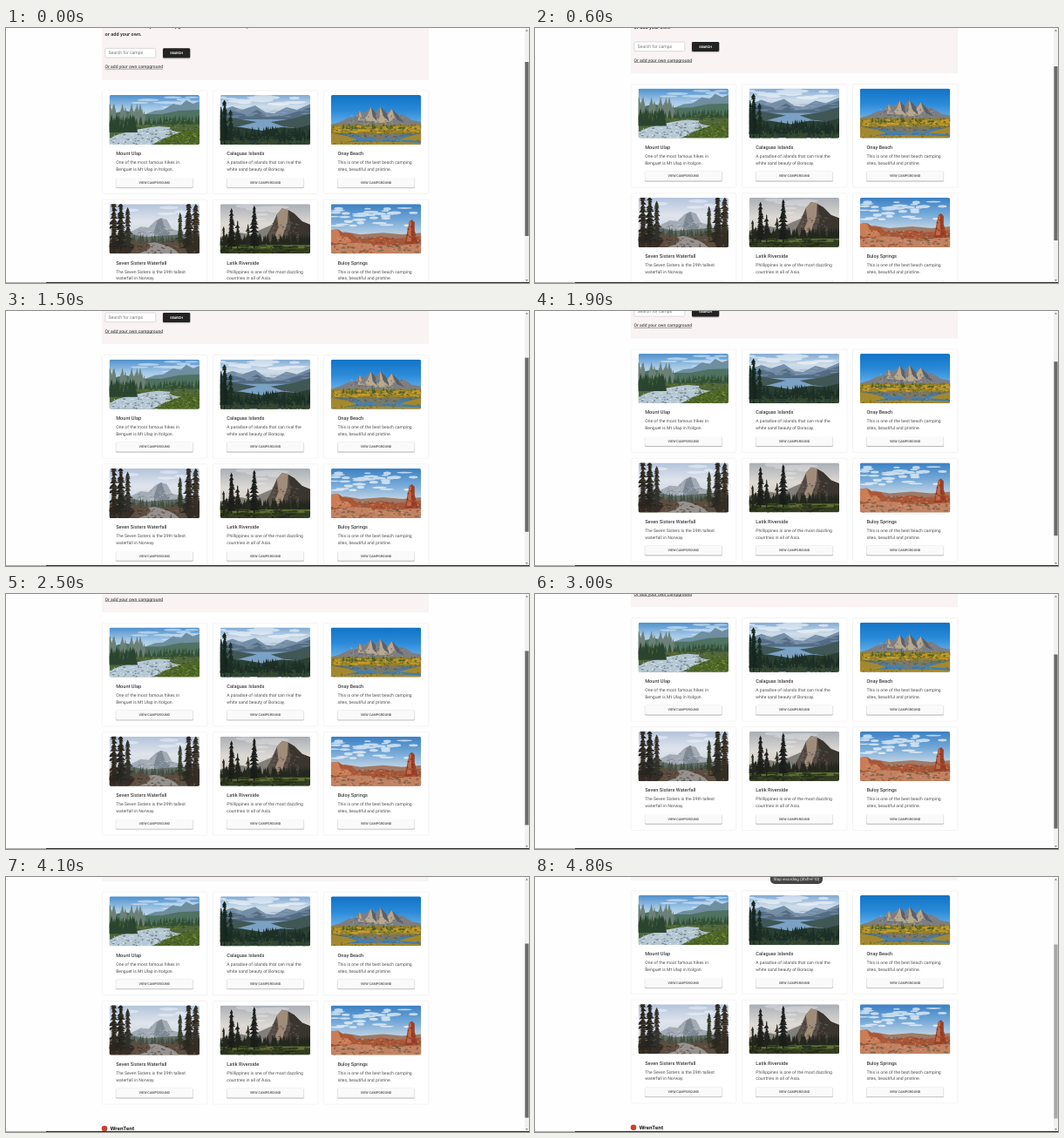
An HTML page for the animation above (4.9 s loop, 600 px wide and 293 px high).

```html
<!DOCTYPE html>
<html lang="en">
<head>
<meta charset="utf-8">
<style>
html, body { margin: 0; width: 100%; height: 100%; overflow: hidden; background: #fefefe; }
svg { display: block; }
text { font-family: Roboto, sans-serif; font-size: 5.06px; fill: #4f4f4f; text-rendering: geometricPrecision; }
.title, .lead { font-size: 5.63px; font-weight: 500; fill: #414141; }
.lead { font-weight: 600; }
.btn { font-size: 3.75px; font-weight: 500; text-anchor: middle; }
</style>
</head>
<body>
<svg id="stage" width="600" height="293" viewBox="0 0 600 293"></svg>
<script>
let seed = 7;
const rnd = () => (seed = seed * 16807 % 2147483647) / 2147483647;
const between = (a, b) => a + (b - a) * rnd();

const rect = (x, y, w, h, fill, more = '') =>
  `<rect x="${x}" y="${y}" width="${w}" height="${h}" fill="${fill}" ${more}/>`;
const text = (x, y, str, cls = '', more = '') => `<text x="${x}" y="${y}" class="${cls}" ${more}>${str}</text>`;
const shape = (fill, d, more = '') => `<path fill="${fill}" d="${d}" ${more}/>`;

// Button with a soft shadow below
const raised = (x, y, w, h, fill) =>
  rect(x - .6, y + .2, w + 1.2, h + 1.3, '#000', 'rx="1.8" opacity=".08"') +
  rect(x - .2, y + .3, w + .4, h + .6, '#000', 'rx="1.5" opacity=".2"') +
  rect(x, y, w, h, fill, 'rx="1.3"');

let gradients = 0;
function fade(y, h, ...colors) {
  const id = 'g' + gradients++;
  const stops = colors.map((c, i) => `<stop offset="${i / (colors.length - 1)}" stop-color="${c}"/>`).join('');
  return `<linearGradient id="${id}" x2="0" y2="1">${stops}</linearGradient>` + rect(0, y, 104, h, `url(#${id})`);
}

function forest(x0, x1, y, h, n, fill) {
  let d = '';
  for (let i = 0; i < n; i++) {
    const x = between(x0, x1), t = h * between(.5, 1), w = t * .2;
    d += `M${x - w} ${y}L${x} ${y - t}L${x + w} ${y}Z`;
  }
  return shape(fill, d);
}

// Tall ragged conifer
function pine(x, top, base, w, fill) {
  let d = `M${x - .6} ${base}V${top}h1.2V${base}Z`;
  for (let y = top; y < base - 6; y += 2.2) {
    const r = w * (.3 + .7 * (y - top) / (base - top)) * between(.5, 1.2);
    const l = r * between(.6, 1.3);
    d += `M${x} ${y - 1.5}L${x + r} ${y + 3}L${x - l} ${y + 3.4}Z`;
  }
  return shape(fill, d);
}

function blobs(x0, x1, y0, y1, w, h, n, fill, alpha) {
  let s = '';
  for (let i = 0; i < n; i++) {
    s += `<ellipse cx="${between(x0, x1)}" cy="${between(y0, y1)}" rx="${w * between(.4, 1)}" ry="${h * between(.4, 1)}"/>`;
  }
  return `<g fill="${fill}" opacity="${alpha}">${s}</g>`;
}

// Fine light and dark texture
const grain = (x0, x1, y0, y1, n, dark, light) =>
  blobs(x0, x1, y0, y1, 1.7, .9, n, dark, .6) + blobs(x0, x1, y0, y1, 1.5, .7, n, light, .55);

const scenes = [
  () => fade(0, 30, '#4d90cd', '#a4c8e6', '#d9e5ea') +
    blobs(0, 104, 2, 15, 13, 2, 18, '#f4f8fb', .5) +
    shape('#6f8ea0', 'M36 24L52 18L62 17L73 10L82 12L88 6L96 10L104 7V34H36Z') +
    shape('#4f7261', 'M0 22L18 18L36 22L60 22L80 18L104 17V40H0Z') +
    forest(0, 40, 34, 26, 26, '#6d8078') +
    forest(0, 104, 36, 13, 90, '#345237') +
    rect(0, 34, 104, 23, '#526738') +
    grain(0, 104, 29, 44, 60, '#263d29', '#7f9a4c') +
    shape('#b4c7d3', 'M56 36Q38 38 28 41Q10 44 0 50V57H50Q58 50 84 43Q66 41 70 37Z') +
    grain(2, 72, 39, 57, 70, '#46545c', '#fff') +
    forest(0, 30, 43, 22, 18, '#2b4430') +
    shape('#4d6728', 'M104 39Q78 42 69 48L55 57H104Z') +
    grain(62, 104, 42, 57, 50, '#2d431f', '#a6b052'),
  () => fade(0, 26, '#7fa9d3', '#cfdde9', '#b5c8da') +
    blobs(0, 104, 1, 11, 15, 2.2, 16, '#fff', .55) +
    shape('#748ea8', 'M0 18L14 13L25 17L40 12L52 20L62 21L76 14L88 17L104 10V36H0Z') +
    shape('#546d84', 'M0 23L16 18L30 23L43 17L54 25L72 24L88 19L104 14V40H0Z') +
    blobs(5, 104, 16, 26, 6, .9, 22, '#93a8b9', .5) +
    rect(0, 28, 104, 15, '#7ba1c4') +
    shape('#405755', 'M0 25L18 27L42 31L26 35L0 42ZM104 21L84 27L58 31L72 36L104 40Z') +
    shape('#2b3f34', 'M0 36L24 37L48 41L70 37L88 38L104 34V57H0Z') +
    forest(0, 104, 52, 17, 80, '#1d3027') +
    forest(0, 104, 59, 13, 60, '#344831') +
    grain(0, 104, 42, 57, 50, '#16241c', '#596b42') +
    pine(5, 7, 57, 7, '#14251e') + pine(12, 18, 57, 6, '#1b2d23') + pine(1, 14, 57, 6, '#1a2b22'),
  () => fade(0, 36, '#1273c6', '#2b8bd9', '#6cb2e8') +
    shape('#7d7e82', 'M0 34L10 31L20 26L27 25L33 18L38 21L46 14L51 20L57 13L64 21L70 16L76 22L84 23L93 29L104 31V38H0Z') +
    shape('#b8a88e', 'M33 18L37 29L42 23L46 14L49 25L55 28L57 13L62 27L70 16L73 27L67 31L56 32L45 30L31 29Z') +
    shape('#58606b', 'M46 14L51 20L53 30L48 25ZM57 13L64 21L67 31L60 24ZM70 16L76 22L84 32L75 28Z') +
    grain(22, 84, 23, 34, 35, '#525963', '#c3b69f') +
    rect(0, 34, 104, 11, '#94812c') +
    forest(0, 104, 39, 7, 70, '#4e6128') +
    blobs(0, 104, 36, 43, 4, 1.5, 50, '#d0a02c', .8) +
    grain(0, 104, 37, 45, 40, '#3f4a21', '#dfb746') +
    fade(44, 13, '#5e6f70', '#4581b0', '#3a77a8') +
    shape('#7e7869', 'M27 44L38 50L46 48L54 54L64 49L72 52L82 44Z', 'opacity=".8"') +
    grain(0, 104, 43, 49, 40, '#4c4d25', '#b08e2c') +
    shape('#a28830', 'M0 44L18 47L30 51L18 54L0 55ZM0 55Q45 52 104 55V57H0ZM104 44L88 48L78 51L104 53Z') +
    grain(0, 104, 52, 57, 25, '#5d5422', '#c4a13c'),
  () => fade(0, 40, '#b3c3db', '#dfe4ec', '#ced5dd') +
    blobs(20, 95, 2, 15, 12, 2, 8, '#fff', .4) +
    shape('#a3abb5', 'M22 33L36 26L45 27L53 19L59 16L66 18L72 29L85 32V46H22Z') +
    shape('#7f8a95', 'M55 19L60 16L64 29L70 33L61 41L51 33Z') +
    grain(32, 74, 25, 38, 30, '#707c86', '#cbd0d6') +
    shape('#626d66', 'M0 37L22 34L42 38L65 36L104 34V57H0Z') +
    forest(18, 85, 45, 11, 48, '#454f43') +
    shape('#5b4d40', 'M0 43L27 42L54 45L75 43L104 40V57H0Z') +
    shape('#97928f', 'M33 57Q54 50 44 45L52 44Q74 49 80 57Z') +
    shape('#352d26', 'M0 45L17 44L30 49L22 57H0ZM82 42L104 39V57H90Z') +
    grain(0, 104, 43, 57, 50, '#2a241f', '#947762') +
    pine(5, -4, 55, 9, '#2d271f') + pine(13, 0, 54, 10, '#25241e') + pine(21, 5, 51, 8, '#30312a') +
    pine(81, 11, 50, 6, '#343827') + pine(91, -3, 55, 10, '#2a2922') + pine(99, 1, 56, 10, '#352e25') +
    grain(0, 22, 5, 42, 20, '#1b1a17', '#675846') + grain(86, 104, 8, 45, 20, '#1b1a17', '#675846'),
  () => fade(0, 45, '#a9aeb5', '#ddd9d4', '#d3cabd') +
    blobs(0, 70, 2, 18, 16, 3, 8, '#fff', .3) +
    shape('#81807a', 'M0 38L18 32L34 35L52 27L64 22V48H0Z') +
    shape('#574e47', 'M49 44L58 28L65 12L71 5L78 7L85 11L94 20L104 24V49H49Z') +
    shape('#a18c79', 'M65 12L71 5L78 7L77 22L71 39L60 42L67 27Z') +
    shape('#3b3530', 'M78 7L85 11L94 20L104 24V46L74 43L81 25Z') +
    grain(58, 92, 20, 42, 40, '#3a332d', '#8d7c6c') +
    rect(0, 43, 104, 14, '#323c20') +
    forest(0, 104, 48, 15, 75, '#23281f') +
    rect(0, 47, 104, 4, '#626e33') +
    blobs(0, 104, 48, 56, 9, 1.1, 24, '#1f2a18', .8) +
    grain(0, 104, 45, 57, 45, '#151d12', '#66743b') +
    pine(13, 6, 52, 7, '#1c1d18') + pine(39, 3, 51, 8, '#191d19') + pine(20, 20, 52, 6, '#20221c') +
    pine(32, 24, 50, 5, '#272a20') + pine(4, 27, 53, 5, '#22261c'),
  () => fade(0, 38, '#3b80c3', '#75a9d8', '#cbdae5') +
    blobs(0, 104, 3, 25, 9, 1.9, 34, '#fff', .65) +
    shape('#9f7a66', 'M0 36L16 32L34 35L60 33L82 35L104 33V44H0Z') +
    shape('#a95738', 'M0 30L8 29L14 33L24 34L29 39L40 40L58 37L72 40L104 37V57H0Z') +
    shape('#ca7d56', 'M0 30L8 29L11 37L20 38L25 44L0 46Z') +
    shape('#c18262', 'M0 48Q25 42 48 46T104 44V57H0Z') +
    grain(0, 104, 38, 57, 90, '#743a29', '#e0ac89') +
    blobs(0, 104, 41, 56, 3, 1, 36, '#59593f', .65) +
    shape('#9a4028', 'M85 46L88 29L90 20L93 18L96 21L96 30L100 46Z') +
    shape('#c1694a', 'M87 43L90 21L92 20L92 43Z') +
    grain(88, 97, 26, 45, 10, '#6b2c1f', '#cc7c57')
];

const camps = [
  ['Mount Ulap', 'One of the most famous hikes in', 'Benguet is Mt Ulap in Itolgon.'],
  ['Calaguas Islands', 'A paradise of islands that can rival the', 'white sand beauty of Boracay.'],
  ['Onay Beach', 'This is one of the best beach camping', 'sites, beautiful and pristine.'],
  ['Seven Sisters Waterfall', 'The Seven Sisters is the 39th tallest', 'waterfall in Norway.'],
  ['Latik Riverside', 'Phillippines is one of the most dazzling', 'countries in all of Asia.'],
  ['Buloy Springs', 'This is one of the best beach camping', 'sites, beautiful and pristine.']
];

const card = ([name, line1, line2], i) => `
  <g transform="translate(${110 + i % 3 * 127.1} ${71.6 + (i / 3 | 0) * 125.3})">
    ${rect(.3, .3, 120.4, 118.6, '#fff', 'rx="1.5" stroke="#f0f0f0" stroke-width=".7"')}
    <g transform="translate(8.6 5.4)" clip-path="url(#photo)">${scenes[i]()}</g>
    ${text(16.2, 74.8, name, 'title')}
    ${text(16.2, 84.8, line1)}
    ${text(16.2, 92.6, line2)}
    ${raised(16.2, 100.3, 88.3, 11, '#fbfafb')}
    ${text(60.3, 107.1, 'VIEW CAMPGROUND', 'btn')}
  </g>`;

stage.innerHTML = `
  <clipPath id="photo">${rect(0, 0, 103.3, 57, '#000', 'rx="2"')}</clipPath>
  <g id="page">
    ${rect(110, -60, 375, 119.6, '#f9f3f3')}
    ${text(113.6, -.5, 'Check out our hand-picked campgrounds from all over the world,', 'lead')}
    ${text(113.6, 8.9, 'or add your own.', 'lead')}
    ${rect(113.8, 23.4, 58, 10.6, '#fff', 'rx="1.2" stroke="#c6c6c6" stroke-width=".6"')}
    ${text(117.6, 30.4, 'Search for camps', '', 'style="fill:#757575"')}
    ${raised(180, 23.3, 31.2, 11, '#232323')}
    ${text(195.6, 30.2, 'SEARCH', 'btn', 'style="fill:#fff;font-weight:700"')}
    ${text(113.6, 46, 'Or add your own campground', '', 'style="font-weight:500"')}
    ${rect(113.6, 46.8, 66.4, .5, '#4f4f4f')}
    ${camps.map(card).join('')}
    <circle cx="113" cy="343.8" r="3.3" fill="#c9432d"/>
    ${text(119.4, 346, 'WrenTent', '', 'style="font:700 5.9px Inter,sans-serif;fill:#111"')}
  </g>
  ${rect(595, 0, 5, 292, '#f1f1f1')}
  ${shape('#555', 'M596.2 3.6L597.5 2L598.8 3.6ZM596.2 289.2L597.5 290.8L598.8 289.2Z')}
  ${rect(595.4, 39, 4.2, 200, '#6a6a6a', 'id="thumb"')}
  <g id="pill">
    ${rect(270, -4, 60, 12, '#454547', 'rx="5"')}
    ${text(300, 4.3, 'Stop recording (Shift+F10)', '', 'style="font-size:4.5px;fill:#fff;text-anchor:middle"')}
  </g>
  ${rect(0, 292, 600, 1, '#2a2a2a')}
  ${rect(0, 292, 46, 1, '#aaa')}`;

// Scroll distance at given tenths of a second
const stops = [[0, 0], [6, 7.4], [11, 14.8], [19, 27.9], [25, 38.5], [36, 51.4], [43, 56], [49, 56]];
const [page, thumb, pill] = ['page', 'thumb', 'pill'].map(id => document.getElementById(id));

function scrollAt(tick) {
  const i = stops.findIndex(([t]) => t > tick);
  const [t0, y0] = stops[i - 1], [t1, y1] = stops[i];
  return y0 + (y1 - y0) * (tick - t0) / (t1 - t0);
}

function draw(now) {
  const tick = Math.floor(now % 4900 / 100);
  const paused = tick === 26 || tick === 31;
  const y = scrollAt(paused ? tick - 1 : tick);
  page.setAttribute('transform', `translate(0 ${-y})`);
  thumb.setAttribute('y', 39 + y * .687);
  thumb.setAttribute('fill', tick < 43 ? '#6a6a6a' : '#a8a8a8');
  pill.setAttribute('transform', `translate(0 ${Math.min(0, (tick - 48) * 4)})`);
  requestAnimationFrame(draw);
}
requestAnimationFrame(draw);
</script>
</body>
</html>
```
